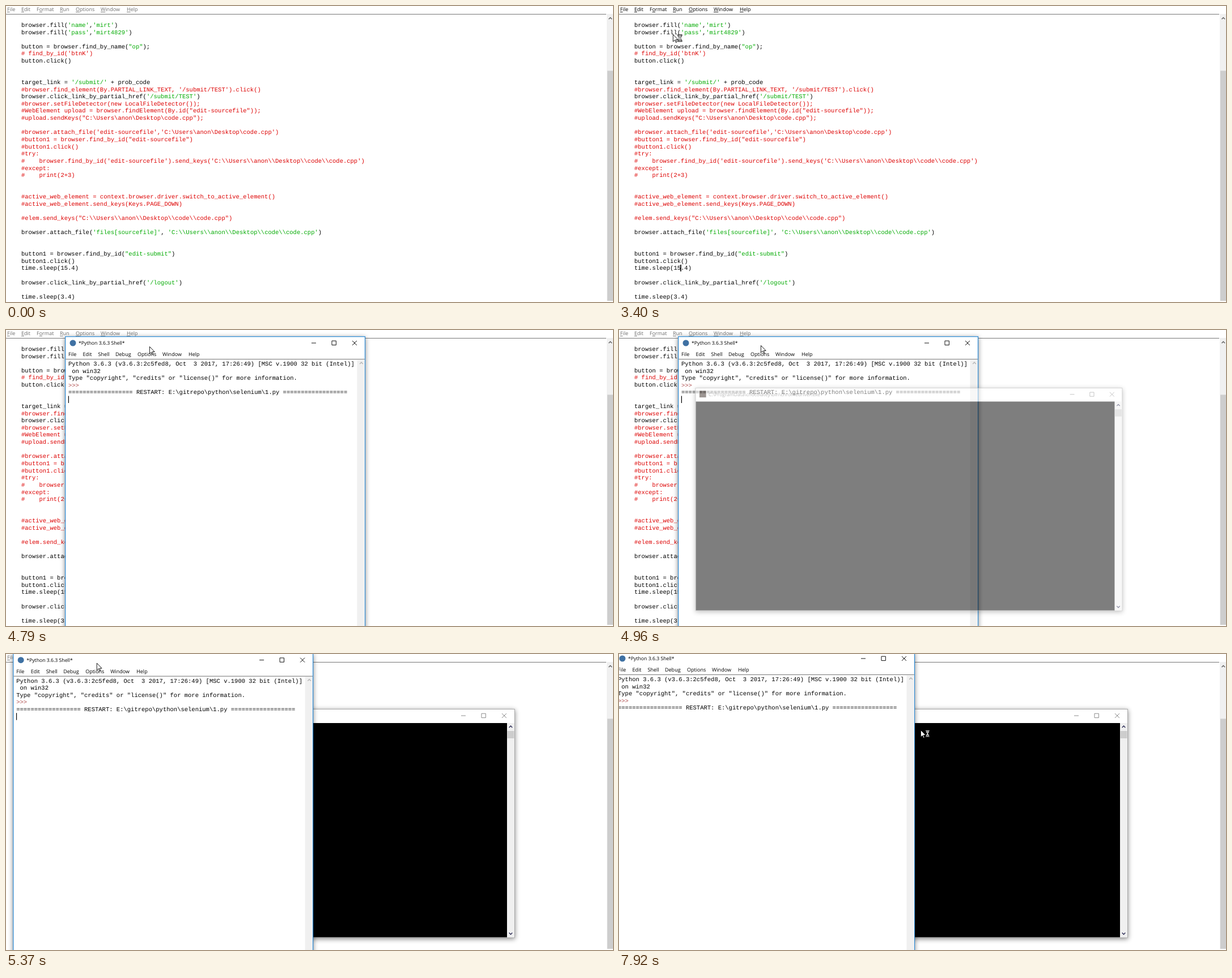
An HTML page for the animation above (7990 ms loop, 1071 by 523 pixels).

```html
<!DOCTYPE html>
<html lang="en">
<head>
<meta charset="utf-8">
<title>Running a script from the editor</title>
<style>
html, body { margin: 0; width: 100%; height: 100%; overflow: hidden; background: #fff; }
svg { display: block; }
text { white-space: pre; text-rendering: geometricPrecision; }
.code { font: 10.52px "Liberation Mono", "Courier New", monospace; }
.ui { font: 9px "Open Sans", "Noto Sans", sans-serif; }
.title { font: 8.7px "Open Sans", "Noto Sans", sans-serif; }
.soft { filter: blur(.8px); }
.window { filter: drop-shadow(0 2px 4.5px rgba(0,0,0,.48)); }
</style>
</head>
<body>
<svg id="stage" width="1071" height="523" viewBox="0 0 1071 523"></svg>
<script>
const LOOP = 7990, PITCH = 12.632;
const RED = '#dd0000', GREEN = '#00aa00';

const CODE = String.raw`browser.fill('name','mirt')
browser.fill('pass','mirt4829')

button = browser.find_by_name("op");
# find_by_id('btnK')
button.click()


target_link = '/submit/' + prob_code
#browser.find_element(By.PARTIAL_LINK_TEXT, '/submit/TEST').click()
browser.click_link_by_partial_href('/submit/TEST')
#browser.setFileDetector(new LocalFileDetector());
#WebElement upload = browser.findElement(By.id("edit-sourcefile"));
#upload.sendKeys("C:\Users\anon\Desktop\code.cpp");

#browser.attach_file('edit-sourcefile','C:\Users\anon\Desktop\code.cpp')
#button1 = browser.find_by_id("edit-sourcefile")
#button1.click()
#try:
#    browser.find_by_id('edit-sourcefile').send_keys('C:\\Users\\anon\\Desktop\\code\\code.cpp')
#except:
#    print(2+3)


#active_web_element = context.browser.driver.switch_to_active_element()
#active_web_element.send_keys(Keys.PAGE_DOWN)

#elem.send_keys("C:\\Users\\anon\\Desktop\\code\\code.cpp")

browser.attach_file('files[sourcefile]', 'C:\\Users\\anon\\Desktop\\code\\code.cpp')


button1 = browser.find_by_id("edit-submit")
button1.click()
time.sleep(15.4)

browser.click_link_by_partial_href('/logout')

time.sleep(3.4)`.split('\n');

const BAR = '='.repeat(18);
const BANNER = [
  'Python 3.6.3 (v3.6.3:2c5fed8, Oct  3 2017, 17:26:49) [MSC v.1900 32 bit (Intel)]',
  ' on win32',
  'Type "copyright", "credits" or "license()" for more information.'
];
const RESTART = BAR + String.raw` RESTART: E:\gitrepo\python\selenium\1.py ` + BAR;

// ---- drawing helpers ----
function el(parent, tag, attrs = {}, content) {
  const e = document.createElementNS('http://www.w3.org/2000/svg', tag);
  for (const k in attrs) e.setAttribute(k, attrs[k]);
  if (content !== undefined) e.textContent = content;
  return parent.appendChild(e);
}
const group = (p, attrs) => el(p, 'g', attrs);
const rect = (p, x, y, width, height, fill, more) => el(p, 'rect', { x, y, width, height, fill, ...more });
const line = (p, d, stroke, w = 1, more) => el(p, 'path', { d, stroke, 'stroke-width': w, fill: 'none', ...more });
const label = (p, cls, x, y, s, more) => el(p, 'text', { class: cls, x, y, ...more }, s);
const show = (e, on) => e.setAttribute('visibility', on ? 'inherit' : 'hidden');

function chevron(p, x, y, dir, color) {
  line(p, `M${x - 2.8} ${y + 1.4 * dir}l2.8 ${-2.8 * dir}l2.8 ${2.8 * dir}`, color, 1.4);
}
function windowButtons(p, x, y, color) {
  line(p, `M${x - 4} ${y}h8M${x + 32} ${y - 3.8}h7.4v7.4h-7.4z` +
    `M${x + 68} ${y - 4}l8 8m0 -8l-8 8`, color);
}

const svg = document.getElementById('stage');

// ---- editor ----
rect(svg, 0, 0, 1071, 523, '#fff');
const runMark = rect(svg, 92, 0, 24, 13, '#c4e5fc');
const menuBar = group(svg);
[['', 'F', 'ile', 2], ['', 'E', 'dit', 27], ['F', 'o', 'rmat', 54], ['', 'R', 'un', 95],
 ['', 'O', 'ptions', 123], ['', 'W', 'indow', 167], ['', 'H', 'elp', 213]].forEach(([a, key, b, x]) => {
  const t = label(menuBar, 'ui', x, 9.3);
  el(t, 'tspan', {}, a);
  el(t, 'tspan', { 'text-decoration': 'underline' }, key);
  el(t, 'tspan', {}, b);
});
rect(svg, 0, 14, 1059, 1.1, '#808080');
rect(svg, 1060, 14, 11, 507, '#f0f0f0');
rect(svg, 1061, 114.4, 10, 406.6, '#cdcdcd');
chevron(svg, 1066.3, 21.8, 1, '#606060');
CODE.forEach((s, i) => {
  const t = label(svg, 'code', 27, 36.9 + i * PITCH);
  if (s[0] === '#') el(t, 'tspan', { fill: RED }, s);
  else s.split(/('[^']*'|"[^"]*")/).forEach((part, j) => el(t, 'tspan', { fill: j % 2 ? GREEN : '#000' }, part));
});
const caret = rect(svg, 108.2, 457, 1.6, 12, '#000');

// ---- Run menu; its shadow does not fade ----
const popupShadow = line(svg, 'M4 64H126V18', 'rgba(0,0,0,.5)', 3.4, { class: 'soft' });
const popup = group(svg);
rect(popup, .5, 14.5, 123.5, 47.5, '#f2f2f2', { stroke: '#ccc' });
const hover = rect(popup, 2, 16, 120, 15, '#91c9f7');
[['Python Shell', ''], ['Check Module', 'Alt+X'], ['Run Module', 'F5']].forEach(([name, key], i) => {
  label(popup, 'ui', 15, 26.6 + 15 * i, name);
  label(popup, 'ui', 84, 26.6 + 15 * i, key);
});

// ---- windows ----
const layers = group(svg);

const shell = group(layers);
rect(shell, 104.7, 11.7, 528.8, 530, '#fff', { class: 'window', stroke: '#2a8ad6', 'stroke-width': 1.2 });
el(shell, 'circle', { cx: 118, cy: 23, r: 5.5, fill: '#3f71a3' });
label(shell, 'title', 128, 26.2, '*Python 3.6.3 Shell*');
windowButtons(shell, 543, 23, '#111');
[['File', 110], ['Edit', 135.5], ['Shell', 162.5], ['Debug', 193], ['Options', 232], ['Window', 276], ['Help', 322]]
  .forEach(([s, x]) => label(shell, 'ui', x, 46.3, s));
rect(shell, 105.3, 51, 527.5, 1.1, '#808080');
rect(shell, 619.5, 52.5, 13.3, 490, '#f0f0f0');
chevron(shell, 627, 58.5, 1, '#b4b4b4');
const shellLine = (p, i, s, fill = '#000') => label(p, 'code', 110, 62.9 + i * PITCH, s, { fill });
const banner = group(shell);
BANNER.forEach((s, i) => shellLine(banner, i, s));
shellLine(banner, 3, '>>>', '#b05050');
const restart = shellLine(shell, 4, RESTART);
const shellCaret = rect(shell, 109.8, 116.5, 1.2, 12.5, '#000');

const term = group(layers);
rect(term, 125.5, 97.5, 772, 403.5, '#fff', { class: 'window', stroke: '#aaa' });
rect(term, 132.5, 102.5, 12, 12, '#3d302a');
label(term, 'title', 149, 112.4, String.raw`C:\ProgramData\chocolatey\bin\chromedriver.exe`, { fill: '#777' });
windowButtons(term, 807, 109, '#8c8c8c');
rect(term, 126, 122, 758, 378.5, '#000');
rect(term, 884, 122, 13, 378.5, '#f0f0f0');
rect(term, 884.5, 136, 12, 13, '#cdcdcd');
chevron(term, 890.5, 128.5, 1, '#2b2b55');
chevron(term, 890.5, 494, -1, '#2b2b55');

// ---- pointers, origin at the hot spot ----
const pointer = group(svg);
const outline = { fill: '#fff', stroke: '#000', 'stroke-width': .9, 'stroke-linejoin': 'miter' };
const beam = line(pointer, 'M-2.6 -6h5.2M0 -6v12M-2.6 6h5.2', '#333', .9);
const arrow = el(pointer, 'path', { d: 'M.4 .4V13L3.4 10.1L5.4 14.6L7.1 13.8L5.2 9.5H9.2Z', ...outline });
const glass = el(pointer, 'path', {
  d: 'M8.7 .6h7.4v1.8h-.8v1.6l-2 2.7l2 2.7v1.6h.8v1.8h-7.4v-1.8h.8v-1.6l2 -2.7l-2 -2.7v-1.6h-.8z', ...outline
});
const sand = line(pointer, 'M9 2.4h6.8M9 11h6.8M11.2 4.4h2.4M11 9.6h2.8', '#000', .8);

// ---- timeline ----
const steps = (t0, t1, n, kind, x0, y0, x1, y1) => Array.from({ length: n }, (_, i) => {
  const f = i / (n - 1);
  return [Math.round(t0 + (t1 - t0) * f), kind, x0 + (x1 - x0) * f, y0 + (y1 - y0) * f];
});

// share of the drag done
const DRAG = [[0, 0], [5270, .45], [5370, .82], [5430, .95], [5510, 1]];
const POINTER = [
  [0, 'none', 0, 0],
  ...steps(300, 360, 2, 'beam', 582, 246.5, 249, 139.5),
  ...steps(590, 670, 2, 'beam', 160, 82, 68, 25.5),
  [750, 'none', 0, 0],
  ...steps(1380, 1690, 5, 'arrow', 105, 1, 107, 8),
  ...steps(2240, 2940, 10, 'arrow', 107, 10, 95, 50),
  [3400, 'busy', 95, 50],
  ...steps(4250, 4790, 8, 'arrow', 115, 47, 253, 29),
  ...steps(4870, 5030, 3, 'arrow', 252, 28, 248, 26),
  ...DRAG.slice(1).map(([t, p]) => [t, 'arrow', 248 - 107.5 * p, 26 - 12.5 * p]),
  ...steps(6060, 6300, 4, 'arrow', 175, 21, 281, 45),
  ...steps(7250, 7370, 3, 'arrow', 365, 75, 532, 134),
  [7920, 'busy', 532, 134]
];
const POPUP = [[0, 0], [1850, .3], [1930, .75], [2000, 1], [3170, .6], [3250, .2], [3320, 0]];
// time, opacity, scale
const SHELL = [[0, 0, 1], [3630, .3, .94], [3710, .7, .98], [3790, .95, .995], [3860, 1, 1]];
const TERM = [[0, 0, 1], [4950, .5, .975], [5030, .88, .994], [5110, 1, 1]];

const at = (table, t) => table.findLast(row => row[0] <= t);
const between = (t, a, b) => t >= a && t < b;

function place(g, [, opacity, scale], cx, cy, dx = 0, dy = 0) {
  show(g, opacity > 0);
  g.setAttribute('opacity', opacity);
  g.setAttribute('transform', `translate(${cx + dx} ${cy + dy}) scale(${scale}) translate(${-cx} ${-cy})`);
}

function draw(t) {
  const [, kind, x, y] = at(POINTER, t);
  pointer.setAttribute('transform', `translate(${x} ${y})`);
  show(beam, kind === 'beam');
  show(arrow, kind === 'arrow' || kind === 'busy');
  show(glass, kind === 'busy');
  show(sand, kind === 'busy');

  menuBar.setAttribute('fill', between(t, 1850, 3630) ? '#000' : '#6d6d6d');
  show(runMark, between(t, 1850, 3250));
  show(caret, between(t, 1850, 2480) || between(t, 2790, 3630));

  const fade = at(POPUP, t)[1];
  show(popup, fade > 0);
  show(popupShadow, fade > 0);
  popup.setAttribute('opacity', fade);
  const item = Math.floor((y - 16) / 15);
  show(hover, fade > 0 && item >= 0);
  hover.setAttribute('y', 16 + 15 * item);

  const p = at(DRAG, t)[1];
  place(shell, at(SHELL, t), 369, 275, -112 * p, -15 * p);
  place(term, at(TERM, t), 511, 299);
  const front = t >= 5190 ? shell : term;
  if (layers.lastChild !== front) layers.append(front);
  show(banner, t >= 3860);
  show(restart, t >= 3940);
  show(shellCaret, t >= 4020);
}

const start = performance.now();
function tick() {
  draw((performance.now() - start) % LOOP);
  requestAnimationFrame(tick);
}
tick();
</script>
</body>
</html>
```
